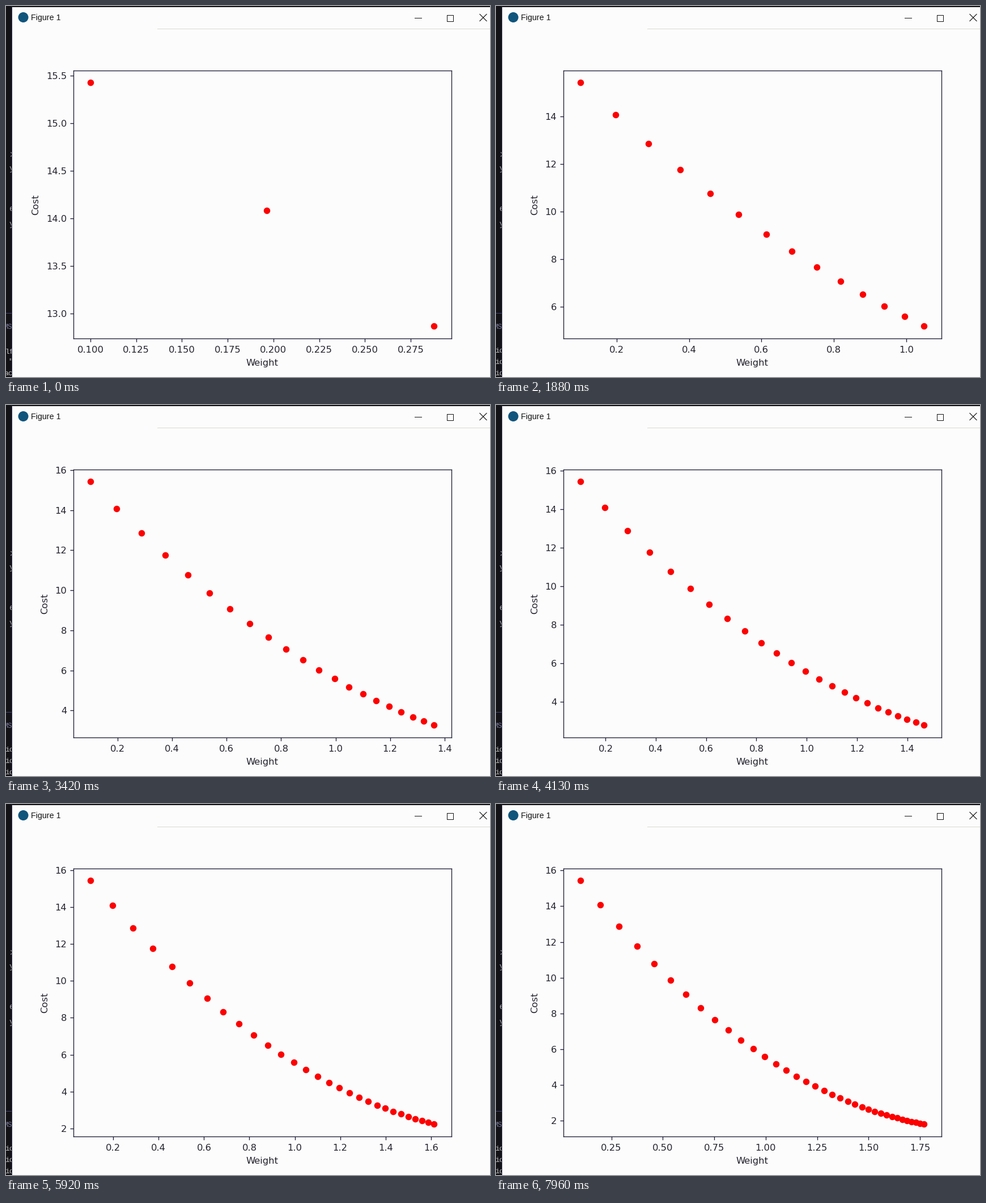
These frames come from a looping animation (854x655 px, 8000 ms). A matplotlib script:

```python
import numpy as np
import matplotlib.pyplot as plt
from matplotlib.animation import FuncAnimation
from matplotlib.patches import Circle, Rectangle

W, H, DPI = 854, 655, 128
FRAMES, STEP = 200, 40
PT = 72 / DPI        # points per pixel
SCALE = 118 / DPI    # plot drawn at 118 dpi proportions
INK = "#22222c"
EDGE = "#1b1b34"

plt.rcParams.update({
    "font.family": "DejaVu Sans",
    "font.size": 10 * SCALE,
    "axes.linewidth": 0.8 * SCALE,
    "axes.edgecolor": EDGE,
    "axes.labelcolor": INK,
    "text.color": INK,
    "xtick.labelcolor": INK,
    "ytick.labelcolor": INK,
})

# Gradient descent path: weight and cost after each step
step = np.arange(36)
weight = 0.1 + 1.9044 * (1 - np.exp(-0.0504 * step)) + 0.002637 * step
cost = 1.4 + 14.0257 * np.exp(-0.1008 * step)

# Time in ms at which each dot appears; redraws slow down as dots pile up
knots = [3, 4, 10, 13, 14, 18, 24, 25, 26, 28, 30, 31, 32, 34, 36]
times = [0, 130, 1080, 1590, 1750, 2670, 4060, 4340, 4750, 5250, 6000,
         6250, 6670, 7340, 7950]
shown_at = np.interp(step + 1, knots, times)

fig = plt.figure(figsize=(W / DPI, H / DPI), dpi=DPI)
stage = fig.add_axes([0, 0, 1, 1])
stage.set(xlim=(0, W), ylim=(H, 0))
stage.axis("off")


def box(x, y, w, h, color, z=0):
    stage.add_patch(Rectangle((x, y), w, h, fc=color, lw=0, zorder=z))


def stroke(xs, ys, color="#161616", z=5, width=1.0):
    stage.plot(xs, ys, color=color, lw=width * PT, zorder=z)


def code(x, y, text, color="#c4c4c4", size=13):
    return stage.text(x, y, text, color=color, size=size * PT, zorder=2,
                      family="Liberation Mono", va="center_baseline")


# Dark editor strip behind the window
box(0, 0, W, H, "#131316")
stroke([0, 10], [541.8, 541.8], "#45457a", z=1)
for y, letter in [(260, "x"), (285, "y"), (357, "e"), (383, "y")]:
    code(6, y, letter, "#a8a8a8", 15)
code(-5, 565, "MS", "#77779a")
first_log = [code(-2, 609, "lf"), code(4, 627, '"'), code(-4, 648, "ac")]
later_log = [code(-2, y, "ic") for y in (608, 628, 648)]

# Window with title bar
box(10, 1, 1, H, "#33335c", z=3)
box(11, 1.5, W, H, "#fcfcfd", z=3)
stroke([267, W], [39.8, 39.8], "#d9d9cc", z=4)
stage.add_patch(Circle((30.5, 20), 9, fc="#11557c", lw=0, zorder=5))
stage.text(44.4, 25, "Figure 1", family="Liberation Sans", size=14.3 * PT,
           color="#111111", va="baseline", zorder=5)
stroke([721, 733], [20.8, 20.8])
stroke([778.2, 789.2, 789.2, 778.2, 778.2], [15.8, 15.8, 26.8, 26.8, 15.8])
stroke([836, 848], [14.5, 26.5], width=1.2)
stroke([836, 848], [26.5, 14.5], width=1.2)

# Scatter plot
left, right, top, bottom = 118.8, 785.8, 113.8, 586.8
ax = fig.add_axes([left / W, 1 - bottom / H,
                   (right - left) / W, (bottom - top) / H])
ax.patch.set_visible(False)
ax.set_xlabel("Weight", labelpad=4 * SCALE + PT)
ax.set_ylabel("Cost", labelpad=4 * SCALE + 4 * PT)
ax.tick_params(length=3.5 * SCALE, width=0.8 * SCALE, pad=3.5 * SCALE,
               color=EDGE)
ax.tick_params(axis="x", pad=3.5 * SCALE + 2 * PT)
dots, = ax.plot([], [], "o", color="#fc0000", ms=6 * SCALE, mew=SCALE)


def padded(values):
    lo, hi = values.min(), values.max()
    pad = 0.05 * (hi - lo)
    return lo - pad, hi + pad


def update(frame):
    # A dot counts as soon as it appears within the frame's span
    n = int(np.sum(shown_at < (frame + 1) * STEP))
    dots.set_data(weight[:n], cost[:n])
    ax.set_xlim(padded(weight[:n]))
    ax.set_ylim(padded(cost[:n]))
    for text in first_log:
        text.set_visible(n == 3)
    for text in later_log:
        text.set_visible(n > 3)


anim = FuncAnimation(fig, update, frames=FRAMES, interval=STEP,
                     repeat=True, repeat_delay=0)
plt.show()
```
